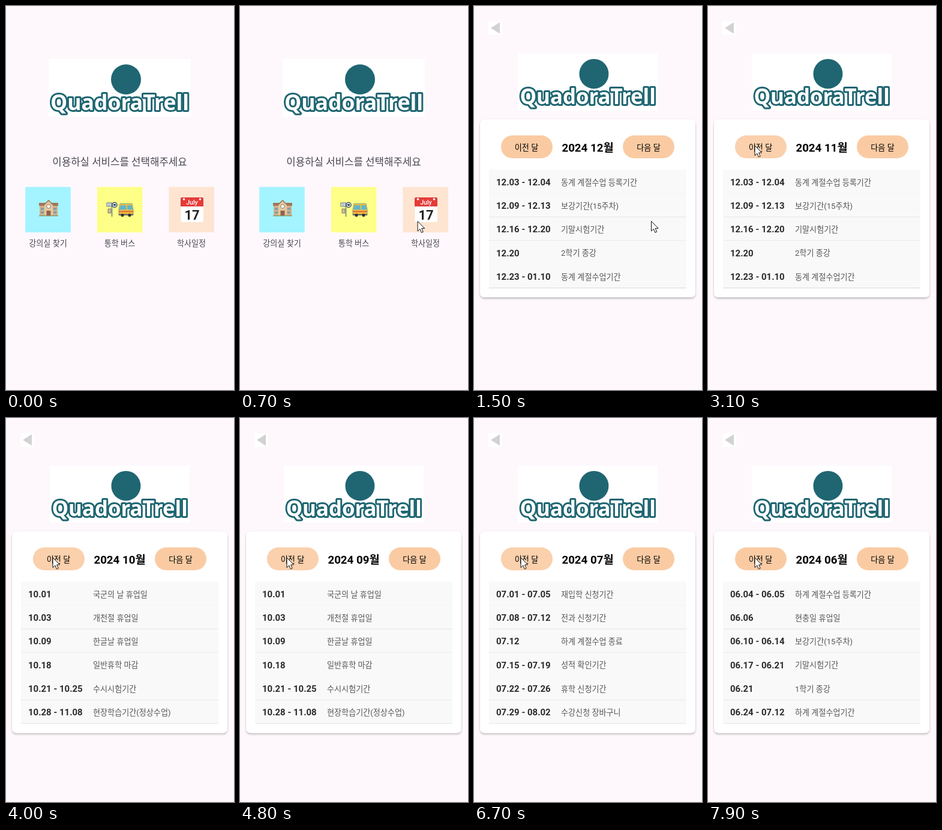
An HTML page that plays this animation: 380x638 px, repeating every 8 s.

```html
<!DOCTYPE html>
<html lang="ko">
<head>
<meta charset="utf-8">
<title>학사일정</title>
<style>
  html, body { margin: 0; width: 100%; height: 100%; overflow: hidden; background: #fef8fd; }
  svg { display: block; width: 100vw; height: 100vh; }
  text { font-family: Roboto, "Noto Sans CJK KR", "Noto Sans CJK", sans-serif; font-size: 13.1px; }
  .mid { text-anchor: middle; }
  .label { fill: #49454f; }
  .heading { font-size: 16.8px; }
  .month { font-size: 18.7px; font-weight: 700; fill: #000; }
  .date { font-size: 14.98px; font-weight: 700; fill: #2b2b2b; }
  .desc { fill: #555; }
  .brand { font: 700 35.5px "Noto Sans", sans-serif; fill: #fff; stroke: #1f6672; stroke-width: 6;
           stroke-linejoin: round; paint-order: stroke; }
</style>
</head>
<body>
<svg viewBox="0 0 380 638">
  <defs>
    <filter id="shadow" x="-5%" y="-10%" width="110%" height="125%">
      <feDropShadow dx="0" dy="2.5" stdDeviation="1.6" flood-color="#000" flood-opacity=".2"/>
      <feDropShadow dx="0" dy="0" stdDeviation=".8" flood-color="#000" flood-opacity=".1"/>
    </filter>
    <g id="logo">
      <rect width="237" height="96" fill="#fff"/>
      <circle cx="129" cy="34" r="25" fill="#1f6672"/>
      <text class="brand mid" x="118.5" y="85">QuadoraTrell</text>
    </g>
  </defs>
  <rect width="380" height="638" fill="#fef8fd"/>

  <g id="home">
    <use href="#logo" x="71" y="88"/>
    <text class="label heading mid" x="189.5" y="265">이용하실 서비스를 선택해주세요</text>
    <rect x="32.2" y="300.6" width="75.6" height="75.6" fill="#a3f4fe"/>
    <rect x="151.8" y="300.6" width="75.6" height="75.6" fill="#fdff86"/>
    <rect x="271.4" y="300.6" width="75.6" height="75.6" fill="#fde5d2"/>
    <text class="label mid" x="70" y="399">강의실 찾기</text>
    <text class="label mid" x="189.5" y="399">통학 버스</text>
    <text class="label mid" x="309" y="399">학사일정</text>

    <g id="school">
      <path d="M56 332h30v16h-30z" fill="#d3b08a"/>
      <path d="M55 327h32v5h-32z" fill="#a2775c"/>
      <path d="M64 330l7-7 7 7v18h-14z" fill="#e3c9a0"/>
      <path d="M63 331l8-8 8 8" fill="none" stroke="#a2775c" stroke-width="1.6"/>
      <circle cx="71" cy="333" r="3.2" fill="#fff" stroke="#8a7a66"/>
      <path d="M67.5 340h7v8h-7z" fill="#96604a"/>
      <path d="M58 337h5M58 343h5M79 337h5M79 343h5" stroke="#6f9fae" stroke-width="3"/>
      <path d="M55 348.5h32" stroke="#8b9468" stroke-width="1.5"/>
    </g>

    <g id="bus">
      <path d="M176.5 327v23" stroke="#78909c" stroke-width="1.8"/>
      <path d="M168 327h8v6h-8z" fill="#fff" stroke="#546e7a"/>
      <path d="M169.5 329h5M169.5 331h5" stroke="#546e7a" stroke-width=".8"/>
      <path d="M170 337h5v7h-5z" fill="#d7bd93" stroke="#6b6258" stroke-width=".8"/>
      <circle cx="181" cy="330.5" r="4" fill="#fff" stroke="#34495e" stroke-width="1.5"/>
      <path d="M179 329h4v3h-4z" fill="#34495e"/>
      <path d="M190 328.5h20l2 10v9h-24v-9z" fill="#f3c23c" stroke="#5f8893" stroke-width=".8"/>
      <path d="M191 331h9l1 7.5h-12zM202 331h7.5l1.5 7.5h-8.500z" fill="#62b5c9"/>
      <path d="M188 341.5h24" stroke="#e0603c" stroke-width="2"/>
      <path d="M188 346.5h24" stroke="#6a615c" stroke-width="2"/>
      <circle cx="194" cy="347.5" r="2.6" fill="#333"/>
      <circle cx="206" cy="347.5" r="2.6" fill="#333"/>
    </g>

    <g id="calendar">
      <rect x="291.5" y="318" width="37.5" height="41" rx="2" fill="#fff"/>
      <path d="M291 333v-13q0-2 2-2h34q2 0 2 2v13z" fill="#e53b38"/>
      <circle cx="296.5" cy="321" r="1.8" fill="#fff"/>
      <circle cx="323.5" cy="321" r="1.8" fill="#fff"/>
      <text class="mid" x="310" y="330" fill="#fff" style="font-size:10.5px;font-weight:500">July</text>
      <text class="mid" x="310" y="355" fill="#222" style="font-size:22px;font-weight:700">17</text>
    </g>
    <rect id="tap" x="271.4" y="300.6" width="75.6" height="75.6" fill="#9a9a94"/>
  </g>

  <g id="page">
    <rect x="-40" width="420" height="638" fill="#fef8fd"/>
    <rect x="24.5" y="25.5" width="22.5" height="22.5" fill="#fff"/>
    <path d="M28 36.5L43 27v19z" fill="#d2d2d2"/>
    <use href="#logo" transform="translate(73.5 79) scale(.98 .99)"/>
    <rect id="card" x="10" y="188.5" width="359" rx="7" fill="#fff" filter="url(#shadow)"/>
    <rect x="45" y="215" width="86" height="38" rx="19" fill="#facba3"/>
    <rect id="press" x="45" y="215" width="86" height="38" rx="19" fill="#fff"/>
    <rect x="248" y="215" width="86" height="38" rx="19" fill="#facba3"/>
    <text class="mid" x="87.5" y="239.5">이전 달</text>
    <text class="mid" x="291" y="239.5">다음 달</text>
    <text id="month" class="month mid" x="189.5" y="242"></text>
    <g id="rows"></g>
  </g>

  <path id="cursor" d="M.5 .5v16.5l3.8-3.6 2.6 6 2.8-1.2-2.6-5.8h5z" fill="#fff" stroke="#111" stroke-linejoin="round"/>
</svg>

<script>
const LOOP = 8000, OPEN = 885, LIST_DELAY = 200;
const ROW = 39.3, TOP = 272, CARD_TOP = 188.5;
const $ = id => document.getElementById(id);
const clamp = v => Math.min(1, Math.max(0, v));

// Each month: when its title shows, its number, "date|event" rows, optional list delay.
const months = [
  [OPEN, 12, ['12.03 - 12.04|동계 계절수업 등록기간', '12.09 - 12.13|보강기간(15주차)',
    '12.16 - 12.20|기말시험기간', '12.20|2학기 종강', '12.23 - 01.10|동계 계절수업기간'], 400],
  [3000, 11, ['11.04 - 11.08|전과 신청기간', '11.11 - 11.15|재입학 신청기간',
    '11.18 - 11.22|동계 계절수업 신청', '11.25 - 11.29|강의평가기간']],
  [3750, 10, ['10.01|국군의 날 휴업일', '10.03|개천절 휴업일', '10.09|한글날 휴업일',
    '10.18|일반휴학 마감', '10.21 - 10.25|수시시험기간', '10.28 - 11.08|현장학습기간(정상수업)']],
  [4700, 9, ['09.02|2학기 개강', '09.02 - 09.13|부전공, 복수전공 신청기간',
    '09.09 - 09.10|수강신청 변경 및 확인', '09.11 - 09.13|2학기 수강신청 교과목 Drop기간',
    '09.16 - 09.18|추석 연휴 휴업일', '09.30 - 10.25|교육실습기간']],
  [5600, 8, ['08.05 - 08.09|2학기 수강신청', '08.15|광복절 휴업일', '08.16|후기 학위수여식',
    '08.19 - 08.23|2학기 등록기간', '08.26 - 08.30|복학 신청기간']],
  [6500, 7, ['07.01 - 07.05|재입학 신청기간', '07.08 - 07.12|전과 신청기간', '07.12|하계 계절수업 종료',
    '07.15 - 07.19|성적 확인기간', '07.22 - 07.26|휴학 신청기간', '07.29 - 08.02|수강신청 장바구니']],
  [7400, 6, ['06.04 - 06.05|하계 계절수업 등록기간', '06.06|현충일 휴업일', '06.10 - 06.14|보강기간(15주차)',
    '06.17 - 06.21|기말시험기간', '06.21|1학기 종강', '06.24 - 07.12|하계 계절수업기간']]
].map(([at, number, rows, delay = LIST_DELAY]) => ({ at, number, rows, loaded: at + delay }));

const lineStrength = [.55, 1, .45, .08, 1, .55];

// Cursor path: time, x, y
const cursorPath = [[150, 386, 376], [750, 295, 357], [1700, 295, 357], [1800, 299, 334], [2500, 77.5, 231.5]];

function bezier(x, [x0, y0], [x1, y1], [x2, y2], [x3, y3]) {
  const at = (s, a, b, c, d) =>
    a * (1 - s) ** 3 + 3 * b * s * (1 - s) ** 2 + 3 * c * s * s * (1 - s) + d * s ** 3;
  let lo = 0, hi = 1;
  for (let i = 0; i < 24; i++) {
    const s = (lo + hi) / 2;
    if (at(s, x0, x1, x2, x3) < x) lo = s; else hi = s;
  }
  return at(lo, y0, y1, y2, y3);
}

// Fast out, extra slow in
function emphasized(t) {
  if (t <= 0 || t >= 1) return clamp(t);
  const knee = [1 / 6, .4];
  return t < knee[0]
    ? bezier(t, [0, 0], [.05, 0], [.1333, .06], knee)
    : bezier(t, knee, [.2083, .82], [.25, 1], [1, 1]);
}

function cursorAt(t) {
  const next = cursorPath.findIndex(p => p[0] > t);
  if (next < 0) return cursorPath.at(-1).slice(1);
  if (next === 0) return [400, 376];
  const [a, b] = [cursorPath[next - 1], cursorPath[next]];
  const k = (t - a[0]) / (b[0] - a[0]);
  const e = 1 - (1 - k) ** 2;
  return [1, 2].map(i => a[i] + (b[i] - a[i]) * e);
}

let shown;
function showRows(list) {
  if (list === shown) return;
  shown = list;
  const rows = list ? list.rows : [];
  $('card').setAttribute('height', TOP + ROW * rows.length + 15.5 - CARD_TOP);
  $('rows').innerHTML = rows.map((row, i) => {
    const [date, desc] = row.split('|');
    const y = TOP + ROW * i;
    return `<rect x="25" y="${y}" width="329" height="${ROW + .1}" fill="#f9f9f9"/>
      <rect x="25" y="${Math.floor(y + ROW)}" width="329" height="1" fill="#d8d8d8" opacity="${lineStrength[i]}"/>
      <text class="date" x="37" y="${Math.round(y + 25.8)}">${date}</text>
      <text class="desc" x="145" y="${Math.round(y + 25.5)}">${desc}</text>`;
  }).join('');
}

function render(t) {
  const p = emphasized((t - OPEN) / 450);
  $('home').setAttribute('transform', `translate(${-38 * p} 0)`);
  $('page').setAttribute('transform', `translate(${38 * (1 - p)} 0)`);
  $('page').setAttribute('opacity', clamp((t - OPEN - 50) / 83));
  $('tap').setAttribute('opacity', .3 * clamp((t - 800) / 150));

  const current = months.findLast(m => m.at <= t) || months[0];
  $('month').textContent = `2024 ${String(current.number).padStart(2, '0')}월`;
  showRows(months.findLast(m => m.loaded <= t) || null);

  const pressed = current !== months[0] && t - current.at < 400;
  $('press').setAttribute('opacity', pressed ? .1 : 0);
  $('cursor').setAttribute('transform', `translate(${cursorAt(t)})`);
}

const start = performance.now();
function tick() {
  render((performance.now() - start) % LOOP);
  requestAnimationFrame(tick);
}
tick();
</script>
</body>
</html>
```
